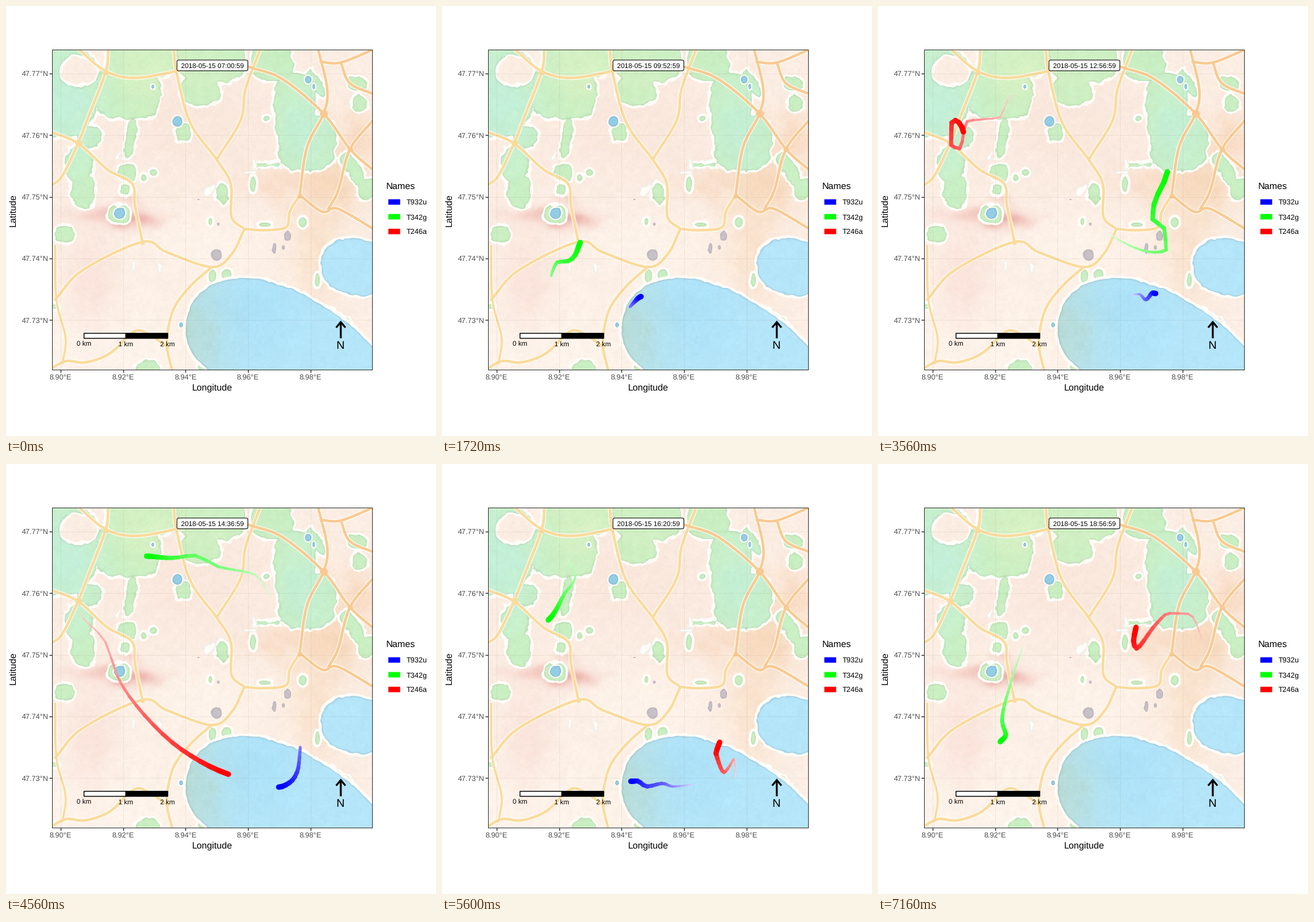
Write a matplotlib script that moves like this. It is 700x700 px and loops after 7200 ms.

```python
import numpy as np
import matplotlib.pyplot as plt
from matplotlib.animation import FuncAnimation
from matplotlib.collections import LineCollection
from matplotlib.patches import FancyBboxPatch, Rectangle

plt.rcParams.update({"font.family": "Liberation Sans", "text.hinting": "no_hinting"})
SIZE, FRAMES, STEP = 700, 180, 40
X0, X1, Y0, Y1, N = 75, 596, 71, 592, 521
TAIL, HEAD_W, TAIL_W = 19, 8.9, 1.8
PT = 0.72
INK, CREAM = "#333333", (255, 253, 248)
rng = np.random.default_rng(4)

fig = plt.figure(figsize=(7, 7), dpi=100, facecolor="white")
page = fig.add_axes([0, 0, 1, 1], xlim=(0, SIZE), ylim=(SIZE, 0))
page.axis("off")
land = fig.add_axes([X0 / SIZE, 1 - Y1 / SIZE, N / SIZE, N / SIZE],
                    xlim=(X0, X1), ylim=(Y1, Y0), xticks=[], yticks=[])
for side in land.spines.values():
    side.set(color=INK, linewidth=PT, zorder=30)

YY, XX = np.mgrid[Y0:Y1, X0:X1] + 0.5


# ---- watercolour helpers
def noise(cells):
    grid = np.linspace(0, cells - 1, N)[:, None]
    w = np.clip(1 - np.abs(grid - np.arange(cells)), 0, 1)
    w = w * w * (3 - 2 * w)
    return w @ rng.normal(size=(cells, cells)) @ w.T


RAGGED = 1.6 * noise(45) + 1.0 * noise(100)
WX, WY = XX + 7 * noise(25), YY + 7 * noise(25)


def wash(base, *spots):
    img = np.ones((N, N, 3)) * base
    for x, y, sx, sy, color, amount in spots:
        g = np.exp(-((WX - x) / sx) ** 2 / 2 - ((WY - y) / sy) ** 2 / 2)
        img += (np.array(color) - img) * (amount * g)[..., None]
    return img


def field(blobs, power=2.0, ragged=1.0):
    """Approximate distance in pixels inside a union of rounded blobs."""
    best = np.full((N, N), -99.0)
    for x, y, rx, ry, *tilt in blobs:
        a = np.radians(tilt[0] if tilt else 0)
        u = (XX - x) * np.cos(a) + (YY - y) * np.sin(a)
        v = (YY - y) * np.cos(a) - (XX - x) * np.sin(a)
        r = (np.abs(u / rx) ** power + np.abs(v / ry) ** power) ** (1 / power)
        slope = np.hypot(*np.gradient(r)) + 1e-3
        best = np.maximum(best, (1 - r) / slope)
    return best + ragged * RAGGED


def lay(img, dist, fill, halo=4, rim=0.07):
    edge = np.clip(dist + halo + 0.5, 0, 1)[..., None]
    body = np.clip(dist + 0.5, 0, 1)[..., None]
    img = img + (np.array(CREAM) - img) * edge
    shade = 1 - rim * np.exp(-(dist / 1.8) ** 2)[..., None]
    return img + (np.array(fill) * shade - img) * body


# ---- ground, woods, water
ground = wash((252, 238, 228),
              (310, 190, 120, 70, (250, 230, 219), 0.8),
              (150, 560, 140, 70, (254, 245, 236), 0.9),
              (320, 390, 90, 40, (254, 244, 235), 0.8),
              (180, 345, 45, 9, (234, 165, 158), 0.6),
              (210, 342, 14, 14, (228, 150, 145), 0.5),
              (140, 450, 28, 60, (249, 220, 212), 0.6),
              (520, 290, 40, 32, (245, 211, 178), 0.9),
              (435, 285, 35, 16, (249, 220, 198), 0.8),
              (508, 390, 26, 75, (249, 224, 200), 0.8),
              (570, 215, 28, 30, (249, 214, 185), 0.7))
green = wash((202, 239, 194),
             (95, 160, 45, 75, (196, 240, 217), 1),
             (235, 110, 45, 32, (216, 242, 196), 1),
             (335, 120, 40, 30, (211, 241, 197), 0.8),
             (490, 205, 40, 60, (197, 239, 212), 1))
blue = wash((181, 230, 250),
            (305, 520, 38, 70, (186, 221, 215), 1),
            (400, 490, 50, 45, (168, 223, 246), 0.6))

forests = [(84, 138, 64, 75, 8), (220, 80, 57, 38), (198, 140, 53, 44), (335, 85, 55, 40),
           (316, 138, 31, 24), (432, 90, 33, 32), (470, 165, 34, 55), (490, 222, 46, 46)]
groves = [(425, 259, 20, 4), (505, 126, 25, 8, 58), (573, 126, 14, 10), (574, 158, 12, 13),
          (565, 266, 32, 12, 60), (588, 298, 17, 18), (118, 258, 23, 28), (126, 302, 19, 27),
          (136, 213, 20, 18), (203, 216, 32, 8, 100), (199, 271, 14, 13), (194, 299, 8, 8),
          (185, 340, 17, 15), (95, 372, 15, 13), (353, 306, 10, 17), (288, 206, 13, 14),
          (230, 592, 20, 14), (546, 514, 28, 9, 42)]
copses = [(402, 290, 5, 13), (333, 352, 4, 6), (336, 440, 6, 11), (359, 437, 8, 9),
          (240, 271, 5, 5), (224, 279, 4, 5), (424, 183, 5, 4), (421, 356, 9, 3),
          (483, 352, 6, 8), (507, 446, 4, 11), (80, 489, 7, 4), (318, 588, 6, 6)]
clearing = field([(118, 106, 29, 23)], ragged=0.8)
wood = np.maximum(field(forests, 3), field(groves, 2.4))
wood = np.maximum(wood, field(copses, ragged=0.3))
lakes = field([(385, 525, 92, 82), (480, 560, 170, 80, 33), (572, 425, 60, 46, 10)], 2.15, 0.5)
ponds = field([(185, 337, 9, 9), (279, 188, 8, 9), (492, 120, 5, 6), (239, 131, 3, 4),
               (285, 519, 3, 4), (501, 131, 2, 4)], ragged=0.3)
flecks = field([(332, 299, 12, 6, -45), (250, 425, 5, 9), (183, 243, 4, 9, 30),
                (404, 257, 4, 9), (397, 271, 13, 4), (208, 423, 2, 9)], ragged=0.9)
built = field([(343, 405, 8, 9), (437, 395, 4, 9), (459, 374, 6, 8), (345, 355, 3, 3),
               (313, 315, 3, 2), (451, 393, 2, 3)], ragged=0.5)

img = lay(ground, np.minimum(wood, -clearing - 3), green)
img = lay(img, flecks, CREAM, 0)
img = lay(img, built, (201, 193, 200), 0)
img = lay(img, lakes, blue, rim=0.1)
img = lay(img, ponds, (148, 206, 230), 2)

grain = 0.5 * noise(40) + 0.6 * noise(110) + 0.6 * noise(260)
img += np.clip(grain, -2, 2)[..., None] * (1.6, 2.0, 2.2)
land.imshow(np.clip(img / 255, 0, 1), extent=(X0, X1, Y1, Y0), aspect="auto",
            interpolation="nearest", zorder=0)


# ---- roads
def curve(flat, n=9):
    p = np.reshape(flat, (-1, 2)).astype(float)
    q = np.vstack([2 * p[0] - p[1], p, 2 * p[-1] - p[-2]])
    a, b, c, d = q[:-3, None], q[1:-2, None], q[2:-1, None], q[3:, None]
    t = np.linspace(0, 1, n)[None, :, None]
    out = (b + (c - a) * t / 2 + (a - 2.5 * b + 2 * c - d / 2) * t ** 2
           + (1.5 * (b - c) + (d - a) / 2) * t ** 3)
    return out.reshape(-1, 2).T


def road(color, *flat, width=4.2):
    x, y = curve(flat)
    for c, w, z in ((CREAM, width + 3, 5), (color, width, 6)):
        land.plot(x, y, color=np.array(c) / 255, lw=w * PT, zorder=z,
                  alpha=0.75 if z == 5 else 1, solid_capstyle="round")


YELLOW, ORANGE = (250, 219, 156), (248, 202, 145)
road(YELLOW, 118, 70, 162, 106, 210, 117, 277, 106, 335, 92, 395, 99)
road(YELLOW, 167, 70, 162, 108, 135, 178, 118, 222, 92, 276, 74, 292)
road(YELLOW, 74, 205, 118, 224, 165, 266, 205, 289, 210, 325, 222, 384)
road(YELLOW, 80, 478, 125, 430, 222, 384, 262, 401, 335, 425, 368, 403, 388, 363)
road(YELLOW, 388, 363, 367, 343, 366, 290, 343, 250, 300, 190, 278, 110, 273, 70)
road(YELLOW, 343, 250, 382, 186, 390, 135, 414, 70)
road(YELLOW, 335, 425, 303, 453, 276, 487, 265, 520, 262, 555, 271, 595)
road(YELLOW, 74, 590, 98, 578, 130, 580, 170, 565, 208, 530, 232, 534, 264, 556)
road(YELLOW, 80, 390, 82, 478, 97, 540, 92, 582, width=3.5)
road(YELLOW, 388, 363, 420, 365, 456, 360, 462, 335, 478, 308)
road(ORANGE, 478, 308, 490, 230, 517, 175, 523, 135, 508, 70)
road(ORANGE, 395, 99, 450, 119, 517, 175, 560, 233, 600, 269)
road(ORANGE, 600, 183, 560, 233, 541, 300, 525, 330)
road(ORANGE, 478, 308, 515, 335, 540, 330, 600, 364)
road(ORANGE, 512, 91, 545, 92, 600, 70)
road(ORANGE, 545, 92, 560, 126, 600, 144)
for x, y, r, c in ((517, 175, 13, ORANGE), (560, 233, 9, ORANGE), (478, 309, 8, ORANGE),
                   (162, 108, 9, YELLOW), (118, 223, 11, YELLOW), (222, 385, 7, YELLOW)):
    land.plot(x, y, "o", ms=r * PT, mew=0, color=np.array(c) / 255, zorder=6)


# ---- axes, legend, scale bar, north arrow
def label(ax, x, y, s, size, ha="center", color="black"):
    return ax.text(x, y + 0.36 * size, s, fontsize=size * PT, ha=ha, va="baseline",
                   color=color, zorder=25)


for k in range(5):
    x, y = 88.9 + 101.7 * k, 109.8 + 100.4 * k
    land.axvline(x, color="#806a50", alpha=0.09, lw=PT, zorder=13)
    land.axhline(y, color="#806a50", alpha=0.09, lw=PT, zorder=13)
    page.plot([x, x], [592.5, 596], color=INK, lw=PT * 1.4)
    page.plot([71, 75], [y, y], color=INK, lw=PT * 1.4)
    label(page, x, 604, f"{8.9 + 0.02 * k:.2f}°E", 12, color="#4d4d4d")
    label(page, 69.5, y, f"{47.77 - 0.01 * k:.2f}°N", 12, "right", "#4d4d4d")
label(page, 335.5, 620, "Longitude", 15)
page.text(13, 332, "Latitude", fontsize=15 * PT, rotation=90, ha="center", va="center")

label(page, 618.3, 292, "Names", 15, "left")
NAMES = {"T932u": (0, 0, 1), "T342g": (0, 1, 0), "T246a": (1, 0, 0)}
for k, (name, c) in enumerate(NAMES.items()):
    y = 319 + 24 * k
    page.add_patch(Rectangle((622.4, y - 4.4), 19.2, 8.9, fc=c, ec="none", snap=False))
    label(page, 652, y, name, 12, "left")

for k, c in enumerate(("white", "black")):
    land.add_patch(Rectangle((127 + 68.2 * k, 532.8), 68.2, 8.2, fc=c, ec="black",
                             lw=1.4 * PT, zorder=24, snap=False))
for k in range(3):
    label(land, 127 + 68 * k, 550, f"{k} km", 11)
for xs, ys in (([545, 545], [541, 515]), ([537.5, 545, 552.5], [523.5, 514.5, 523.5])):
    land.plot(xs, ys, color="black", lw=3 * PT, solid_capstyle="butt",
              solid_joinstyle="miter", zorder=24, snap=False)
label(land, 544.5, 551.5, "N", 18.5)

land.add_patch(FancyBboxPatch((280.3, 90), 111.4, 13.5, boxstyle="round,pad=2,rounding_size=2.5",
                              fc="white", ec="black", lw=PT, zorder=24))
clock = label(land, 336, 97, "", 11)


# ---- tracks: knots of (step, x, y) joined by monotone cubic easing
def track(*knots):
    k = np.reshape(knots, (-1, 3)).astype(float)
    t, p = k[:, 0], k[:, 1:]
    h = np.diff(t)[:, None]
    s = np.diff(p, axis=0) / h
    a, b = s[:-1], s[1:]
    same = a * b > 0
    m = np.vstack([s[:1], np.where(same, 2 * a * b / np.where(same, a + b, 1), 0), s[-1:]])
    now = np.arange(FRAMES)
    i = np.clip(np.searchsorted(t, now, "right") - 1, 0, len(t) - 2)
    u = np.clip((now - t[i]) / h[i, 0], 0, 1)[:, None]
    pos = (p[i] * (1 + 2 * u) * (1 - u) ** 2 + p[i + 1] * u * u * (3 - 2 * u)
           + h[i] * u * (1 - u) * (m[i] * (1 - u) - m[i + 1] * u))
    return int(t[0]), int(t[-1]), pos


TRACKS = {
    "T932u": track(
        0, 307, 491, 30, 306, 490, 36, 313, 482, 43, 324, 473, 52, 360, 467, 56, 373, 479,
        60, 388, 465, 66, 404, 471, 75, 425, 469, 80, 436, 478, 85, 447, 467, 89, 452, 468,
        95, 479, 460, 102, 479, 461, 107, 476, 494, 110, 466, 515, 114, 444, 526,
        121, 410, 522, 127, 376, 525, 131, 358, 520, 134, 334, 525, 137, 318, 516,
        140, 307, 516, 152, 304, 522),
    "T342g": track(
        0, 178, 440, 30, 178, 439, 35, 188, 417, 38, 206, 415, 40, 217, 405, 43, 225, 385,
        52, 262, 334, 54, 270, 323, 60, 318, 335, 66, 357, 352, 71, 384, 376, 78, 450, 401,
        80, 469, 397, 82, 466, 362, 84, 447, 347, 86, 449, 324, 89, 471, 270, 95, 431, 216,
        98, 405, 180, 103, 345, 167, 105, 308, 149, 108, 270, 153, 114, 229, 150,
        121, 205, 155, 125, 217, 182, 131, 199, 212, 140, 173, 254, 150, 88, 288,
        160, 235, 298, 165, 218, 350, 172, 202, 418, 175, 208, 440, 179, 199, 452),
    "T246a": track(
        48, 450, 238, 52, 411, 236, 57, 361, 225, 60, 329, 195, 63, 301, 148, 66, 265, 128,
        71, 211, 153, 73, 199, 181, 77, 145, 188, 80, 133, 232, 82, 119, 226, 85, 120, 190,
        86, 126, 186, 89, 139, 205, 95, 121, 242, 99, 162, 290, 101, 181, 345, 104, 212, 393,
        109, 286, 465, 114, 362, 505, 118, 430, 522, 121, 478, 510, 125, 475, 480,
        128, 468, 492, 131, 459, 502, 137, 446, 471, 138, 446, 471, 140, 452, 453,
        152, 519, 398, 156, 569, 335, 160, 534, 298, 165, 505, 244, 167, 475, 243,
        170, 455, 258, 175, 421, 300, 177, 416, 288, 179, 420, 266),
}
trails = {name: land.add_collection(LineCollection([], capstyle="round", zorder=20), autolim=False)
          for name in TRACKS}


def draw(i):
    h, m = divmod(420 + 4 * i, 60)
    clock.set_text(f"2018-05-15 {h:02}:{m:02}:59")
    for name, (first, last, pos) in TRACKS.items():
        p = pos[max(first, i - TAIL):i + 1]
        shown = first < i <= last
        trails[name].set_visible(shown)
        if shown:
            age = np.arange(len(p) - 1)[::-1]
            fade = (age / (TAIL + 3))[:, None]
            trails[name].set_segments(list(np.stack([p[:-1], p[1:]], axis=1)))
            trails[name].set_linewidths((HEAD_W + (TAIL_W - HEAD_W) * age / (TAIL - 1)) * PT)
            trails[name].set_color(np.array(NAMES[name]) * (1 - fade) + fade)
    return [clock, *trails.values()]


anim = FuncAnimation(fig, draw, frames=FRAMES, interval=STEP, repeat=True, repeat_delay=0)
plt.show()
```
